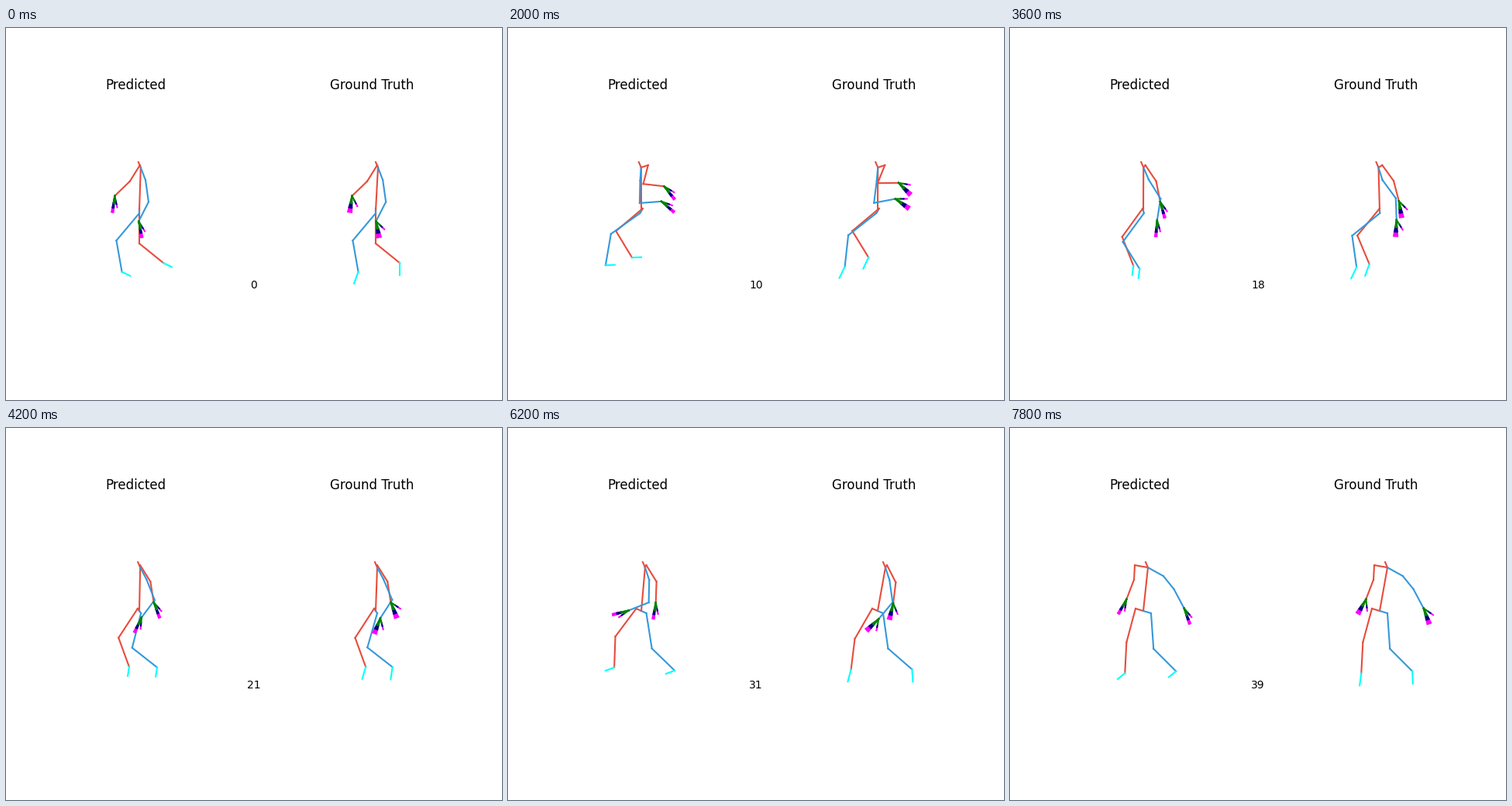
Write a matplotlib script that moves like this. It is 640 px wide and 480 px high and loops after 8 s.

```python
import numpy as np
import matplotlib.pyplot as plt
from matplotlib.animation import FuncAnimation
from matplotlib.collections import LineCollection

W, H = 640, 480
FRAMES, STEP = 40, 200
RED, BLUE, CYAN = "#e74c3c", "#3498db", "cyan"
FINGER = ("green", "navy", "magenta")
KEYS = np.array([0, 6, 15, 21, 25, 31, 39])


def curve(*v):
    """Smooth monotone curve through one value per key time."""
    h = np.diff(KEYS)
    d = np.diff(v) / h
    a, b = d[:-1], d[1:]
    same = a * b > 0
    inner = np.where(same, 2 * a * b / np.where(same, a + b, 1), 0)
    m = np.concatenate([d[:1], inner, d[-1:]])

    def value(t):
        i = int(np.clip(np.searchsorted(KEYS, t, side="right") - 1, 0, len(h) - 1))
        s = (t - KEYS[i]) / h[i]
        return ((1 + 2 * s) * (1 - s) ** 2 * v[i] + s * s * (3 - 2 * s) * v[i + 1]
                + h[i] * s * (1 - s) * ((1 - s) * m[i] - s * m[i + 1]))

    return value


# Sideways shifts in pixels.
sway = curve(3, 4, -5, 2, -2, 10, 10)
hip = curve(0, 2, 1, -2, -5, -7, -10)
shoulder = curve(-1, 9, 9, 0, -1, 2, -17)

# Bone directions in degrees, clockwise from the right.
thigh_r = curve(90, 141, 137, 123, 149, 120, 105)
shin_r = curve(39, 54, 63, 70, 65, 97, 93)
thigh_b = curve(130, 126, 164, 106, 79, 82, 86)
shin_b = curve(80, 75, 126, 38, 61, 41, 45)
upper_r = curve(122, 156, 50, 58, 48, 63, 93)
fore_r = curve(136, 283, 422, 441, 437, 457, 471)
collar_b = curve(69, 98, 86, 62, 68, 72, 29)
upper_b = curve(82, 132, 48, 67, 116, 82, 51)
fore_b = curve(117, 280, 418, 483, 607, 490, 422)
wrist_bend = curve(-38, 52, 28, -12, 12, 6, 8)
loose_toe = curve(26, -70, 95, 99, 260, 160, 141)


def bump(t, mid, width):
    return np.exp(-((t - mid) / width) ** 2)


def step(length, deg):
    a = np.radians(deg)
    return length * np.array([np.cos(a), np.sin(a)])


def chain(start, *bones):
    pts = [np.array(start, float)]
    for length, deg in bones:
        pts.append(pts[-1] + step(length, deg))
    return pts


def path(pts, colors):
    return list(zip(pts, pts[1:], colors))


def hand(wrist, deg, fan, thumb_turn):
    """Four fingers and a thumb, with the tips underneath."""
    reach, side = step(21, deg), step(fan, deg + 90)
    fingers = [reach + side * k for k in np.linspace(-1, 1, 4)]
    fingers.append(step(15, deg - thumb_turn))
    joints = [[wrist + f * end for f in (0, 0.45, 0.72, 1)] for end in fingers]
    return [(p[k], p[k + 1], FINGER[k]) for k in (2, 1, 0) for p in joints]


def skeleton(x, t, predicted):
    fan, thumb_turn, toe, lean = 2.5, 35, 16, 1
    toes = [45 + thigh(t) / 2 for thigh in (thigh_r, thigh_b)]
    if predicted:
        # The forecast runs early at first, later late, and its feet are loose.
        fan, thumb_turn, toe, lean = 1.2, 20, 12, 0.6
        toes = [loose_toe(t)] * 2
        t = t + 2 * bump(t, 15, 4) - 1.5 * bump(t, 31, 3)

    pelvis = np.array([x, 236.0])
    chest = pelvis + (lean * sway(t), -56)
    neck = chest + (-3, -7)
    short = 1 - 0.25 * np.clip(-shoulder(t) / 17, 0, 1)

    leg_r = chain(pelvis + (hip(t), -3),
                  (45, thigh_r(t)), (40, shin_r(t)), (toe, toes[0]))
    leg_b = chain(pelvis + (-hip(t), 3),
                  (46, thigh_b(t)), (41, shin_b(t)), (toe, toes[1]))
    arm_r = chain(chest + (shoulder(t), -3),
                  (25 * short, upper_r(t)), (27, fore_r(t)))
    arm_b = chain(chest, (17 / short, collar_b(t)),
                  (29 * short, upper_b(t)), (28, fore_b(t)))

    bones = path([pelvis, chest, neck], [RED] * 2)
    bones += path([pelvis] + leg_r, [RED] * 3 + [CYAN])
    bones += path([pelvis] + leg_b, [BLUE] * 3 + [CYAN])
    bones += path([chest] + arm_r, [RED] * 3)
    bones += path(arm_b, [BLUE] * 3)
    for arm, fore in ((arm_r, fore_r), (arm_b, fore_b)):
        bones += hand(arm[-1], fore(t) + wrist_bend(t), fan, thumb_turn)
    return bones


fig = plt.figure(figsize=(W / 100, H / 100), dpi=100, facecolor="white")
ax = fig.add_axes([0, 0, 1, 1])
ax.set_xlim(0, W)
ax.set_ylim(H, 0)
ax.axis("off")

lines = LineCollection([], linewidths=1.5, capstyle="projecting")
ax.add_collection(lines, autolim=False)


def label(x, y, text, size):
    return ax.text(x, y, text, fontsize=size, ha="center", va="baseline",
                   family="DejaVu Sans")


label(167.4, 79, "Predicted", 12)
label(472, 79, "Ground Truth", 12)
count = label(320, 336, "0", 10)


def draw(i):
    bones = skeleton(172, i, True) + skeleton(477, i, False)
    lines.set_segments([(a, b) for a, b, _ in bones])
    lines.set_color([c for _, _, c in bones])
    count.set_text(str(i))
    return lines, count


anim = FuncAnimation(fig, draw, frames=FRAMES, interval=STEP, repeat=True)
plt.show()
```
